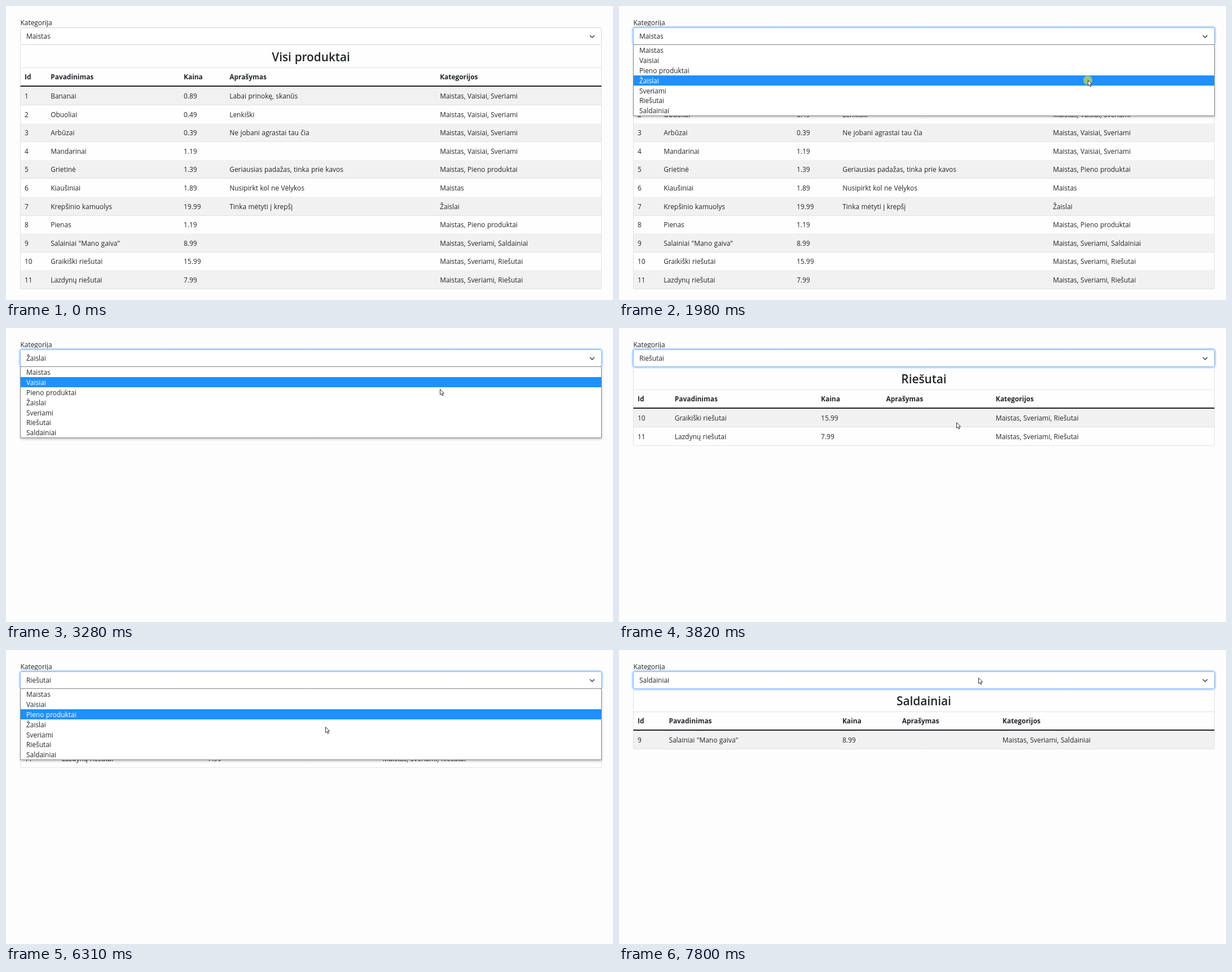
Recreate the animation shown at these times as an HTML page with a canvas. Size 1076 by 521 pixels, loop 8000 ms.

```html
<!DOCTYPE html>
<html lang="lt">
<head>
<meta charset="utf-8">
<title>Visi produktai</title>
<style>
  html, body { margin: 0; width: 100%; height: 100%; overflow: hidden; background: #fdfdfd; }
  canvas { display: block; }
</style>
</head>
<body>
<canvas id="stage" width="1076" height="521"></canvas>
<script>
const ctx = document.getElementById('stage').getContext('2d');
const LOOP = 8000, PRESS = 130, HOVER_LAG = 85;
const LEFT = 25.5, RIGHT = 1055.5, WIDTH = RIGHT - LEFT, PAD = 6.5;
const ROW_TOP = 142.6, ROW_H = 32.57;
const LIST_TOP = 69, OPTION_H = 17.85;
const INK = '#212529', BORDER = '#dee2e6';
const BODY = '11.92px "Open Sans", "Noto Sans", sans-serif';
const BOLD = 'bold ' + BODY;
const TITLE = '600 20.75px "Open Sans", "Noto Sans", sans-serif';
ctx.wordSpacing = '0.4px';

const headers = ['Id', 'Pavadinimas', 'Kaina', 'Aprašymas', 'Kategorijos'];
const options = ['Maistas', 'Vaisiai', 'Pieno produktai', 'Žaislai', 'Sveriami', 'Riešutai', 'Saldainiai'];
const products = `Bananai|0.89|Labai prinokę, skanūs|Maistas, Vaisiai, Sveriami
Obuoliai|0.49|Lenkiški|Maistas, Vaisiai, Sveriami
Arbūzai|0.39|Ne jobani agrastai tau čia|Maistas, Vaisiai, Sveriami
Mandarinai|1.19||Maistas, Vaisiai, Sveriami
Grietinė|1.39|Geriausias padažas, tinka prie kavos|Maistas, Pieno produktai
Kiaušiniai|1.89|Nusipirkt kol ne Vėlykos|Maistas
Krepšinio kamuolys|19.99|Tinka mėtyti į krepšį|Žaislai
Pienas|1.19||Maistas, Pieno produktai
Salainiai "Mano gaiva"|8.99||Maistas, Sveriami, Saldainiai
Graikiški riešutai|15.99||Maistas, Sveriami, Riešutai
Lazdynų riešutai|7.99||Maistas, Sveriami, Riešutai`
  .split('\n').map((line, i) => [String(i + 1), ...line.split('|')]);

// Each choice opens the list with one click and picks an option with another.
const choices = [
  { open: 1050, pick: 1980, value: 'Žaislai' },
  { open: 3070, pick: 3620, value: 'Riešutai' },
  { open: 6110, pick: 6850, value: 'Saldainiai' },
];
const views = [
  makeView(0, 'Maistas', 'Visi produktai', products),
  ...choices.map(({ pick, value }) =>
    makeView(pick + PRESS, value, value, products.filter(p => p[4].includes(value)))),
];

const optionY = name => LIST_TOP + (options.indexOf(name) + 0.5) * OPTION_H;

// Pointer moves: start, end, then the place reached; it rests in between.
const moves = [
  [0, 90, 1044, 512], [90, 850, 997, 46],
  [1120, 1320, 988, 67], [1320, 1720, 831, optionY('Žaislai')],
  [2110, 2650, 800, 55],
  [3070, 3280, 770, 108], [3280, 3620, 598, optionY('Riešutai')],
  [4150, 4950, 513, 78], [5020, 5150, 522, 85], [5150, 5770, 931, 71], [5830, 5970, 938, 59],
  [6110, 6310, 566, 136], [6310, 6580, 560, optionY('Saldainiai')],
  [6980, 7390, 577, 96], [7670, 7800, 637, 49],
];

// Shares the spare width among the columns in proportion to their content.
function makeView(from, value, title, rows) {
  const widths = headers.map((h, c) =>
    Math.max(measure(h, BOLD), ...rows.map(row => measure(row[c], BODY))) + 2 * PAD);
  const scale = WIDTH / widths.reduce((a, b) => a + b);
  let x = LEFT + 1 + PAD;
  const cols = widths.map(w => (x += w * scale) - w * scale);
  return { from, value, title, rows, cols };
}

function measure(str, font) {
  ctx.font = font;
  return ctx.measureText(str).width;
}

function pointerAt(t) {
  let x = 1044, y = 535;
  for (const [start, end, toX, toY] of moves) {
    if (t <= start) break;
    const left = 1 - Math.min(1, (t - start) / (end - start));
    const k = 1 - left * left;
    x += (toX - x) * k;
    y += (toY - y) * k;
  }
  return { x, y };
}

function text(str, x, y, font = BODY, color = INK, align = 'left') {
  ctx.font = font;
  ctx.fillStyle = color;
  ctx.textAlign = align;
  ctx.fillText(str, x, y);
}

function rect(x, y, w, h, color) {
  ctx.fillStyle = color;
  ctx.fillRect(x, y, w, h);
}

function line(points, color, width) {
  ctx.beginPath();
  points.forEach(([x, y]) => ctx.lineTo(x, y));
  ctx.strokeStyle = color;
  ctx.lineWidth = width;
  ctx.stroke();
}

function roundBox(x, y, w, h, r, color, width) {
  ctx.beginPath();
  ctx.roundRect(x, y, w, h, r);
  ctx.strokeStyle = color;
  ctx.lineWidth = width;
  ctx.stroke();
}

function drawTable({ title, cols, rows }) {
  const rowY = r => Math.round(ROW_TOP + r * ROW_H);
  const bottom = rowY(rows.length);
  rect(LEFT, 69, WIDTH, bottom - 69, '#fefefe');
  text(title, 540.5, 97.5, TITLE, INK, 'center');
  headers.forEach((h, c) => text(h, cols[c], 130.3, BOLD));
  rows.forEach((row, r) => {
    const end = rowY(r + 1);
    if (r % 2 === 0) rect(LEFT, rowY(r), WIDTH, end - rowY(r), '#f1f1f1');
    line([[LEFT, end + 0.5], [RIGHT, end + 0.5]], BORDER, 1);
    row.forEach((cell, c) => text(cell, cols[c], 164.2 + r * ROW_H));
  });
  line([[LEFT, 109.5], [RIGHT, 109.5]], BORDER, 1);
  [LEFT, RIGHT].forEach(x => line([[x, 69], [x, bottom]], BORDER, 1));
  rect(LEFT, 141, WIDTH, 2, '#211c26');
}

function drawSelect(value, focused) {
  text('Kategorija', LEFT, 33.8);
  if (focused) roundBox(24, 37, WIDTH + 3, 33, 5, '#c2dbfe', 3);
  rect(LEFT, 38.5, WIDTH, 30, '#fff');
  roundBox(LEFT, 38.5, WIDTH, 30, 3, focused ? '#86b7fe' : '#ced4da', 1);
  text(value, 36, 58.4);
  line([[1035, 52], [1039, 56], [1043, 52]], '#343a40', 1.5);
}

function drawList(active) {
  ctx.save();
  ctx.shadowColor = 'rgba(0,0,0,.25)';
  ctx.shadowBlur = 4;
  ctx.shadowOffsetY = 2;
  rect(LEFT, 68.5, WIDTH, 126, '#fff');
  ctx.restore();
  options.forEach((name, i) => {
    const y = LIST_TOP + i * OPTION_H;
    if (i === active) rect(LEFT, Math.round(y), WIDTH, 18, '#1e90ff');
    text(name, 36, y + 14.2, BODY, i === active ? '#fff' : INK);
  });
  roundBox(LEFT, 68.5, WIDTH, 126, 0, '#858585', 1);
}

function drawPointer({ x, y }, pressed, beam) {
  if (pressed) {
    ctx.beginPath();
    ctx.arc(x, y, 8, 0, 7);
    ctx.fillStyle = 'rgba(255,255,0,.5)';
    ctx.fill();
  }
  ctx.save();
  ctx.translate(Math.round(x), Math.round(y));
  if (beam) {
    line([[0.5, -8], [0.5, 8]], '#555', 1);
    [-8.5, 8.5].forEach(end => line([[-3, end], [3, end]], '#555', 1));
  } else {
    const outline = new Path2D('M.5 .5V10.5L2.8 8.4L4.3 12L6 11.2L4.5 7.8H7.5Z');
    ctx.fillStyle = '#fff';
    ctx.fill(outline);
    ctx.strokeStyle = '#30343c';
    ctx.lineWidth = 1;
    ctx.stroke(outline);
  }
  ctx.restore();
}

function draw(t) {
  const view = views.findLast(v => t >= v.from);
  const open = choices.some(c => t >= c.open && t < c.pick + PRESS);
  const pressed = choices.some(c => [c.open, c.pick].some(click => t >= click && t < click + PRESS));
  const pointer = pointerAt(t);

  rect(0, 0, 1076, 521, '#fdfdfd');
  drawTable(view);
  drawSelect(view.value, t >= choices[0].open);
  if (open) {
    // The highlighted option trails the pointer slightly.
    const hovered = Math.floor((pointerAt(t - HOVER_LAG).y - LIST_TOP) / OPTION_H);
    drawList(hovered < 0 ? options.indexOf(view.value) : hovered);
  }
  const overTitle = !open && pointer.y > 75 && pointer.y < 104 && Math.abs(pointer.x - 540) < 48;
  if (t >= 90) drawPointer(pointer, pressed, overTitle);
}

function tick() {
  draw(performance.now() % LOOP);
  requestAnimationFrame(tick);
}
tick();
</script>
</body>
</html>
```
